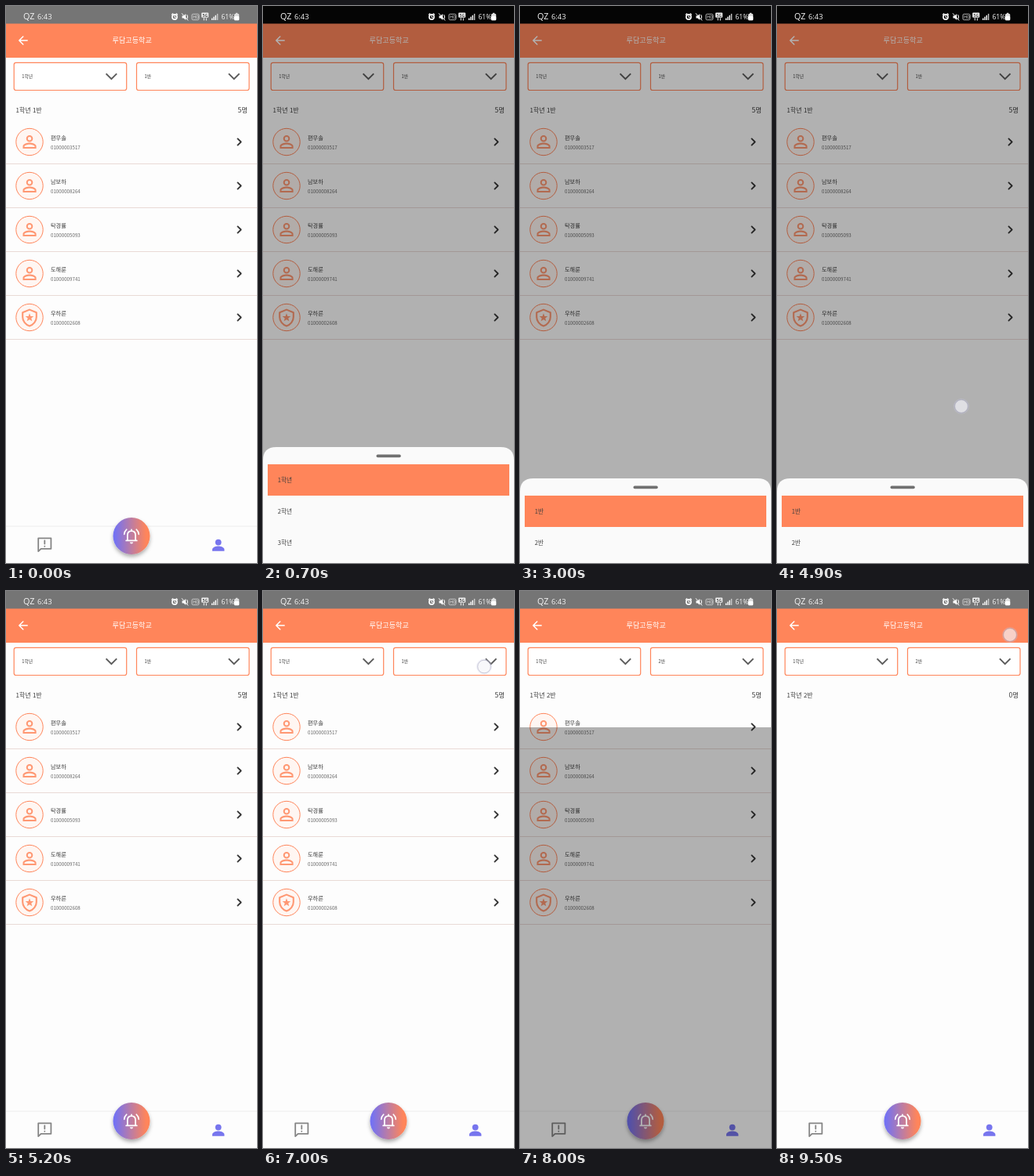
An HTML page that plays this animation: 320 by 711 pixels, repeating every 9.6 s.

```html
<!DOCTYPE html>
<html lang="ko">
<head>
<meta charset="utf-8">
<title>Class list</title>
<style>
  html, body { margin: 0; width: 100%; height: 100%; overflow: hidden; background: #fdfdfd; }
  svg { display: block; width: 100%; height: 100%; }
  text { font-family: "Noto Sans CJK KR", "Noto Sans CJK", "Noto Sans CJK JP", sans-serif; fill: #3c3c3c; }
  .status text { font-family: "Open Sans", "Noto Sans", sans-serif; fill: #f4f4f4; }
  .line { fill: none; stroke-linecap: round; stroke-linejoin: round; }
</style>
</head>
<body>
<svg id="stage" viewBox="0 0 320 711" preserveAspectRatio="none"></svg>
<script>
const ORANGE = '#ff855a', PALE = '#ff9873', LOOP = 9600;

const people = [
  ['편무솔', '01000003517'],
  ['남보하', '01000008264'],
  ['탁경률', '01000005093'],
  ['도해룬', '01000009741'],
  ['우하른', '01000002608'],
];

const text = (x, y, size, content, attrs = '') =>
  `<text x="${x}" y="${y}" font-size="${size}" ${attrs}>${content}</text>`;
const line = (d, color, width, attrs = '') =>
  `<path class="line" d="${d}" stroke="${color}" stroke-width="${width}" ${attrs}/>`;
const rect = (x, y, w, h, fill, attrs = '') =>
  `<rect x="${x}" y="${y}" width="${w}" height="${h}" fill="${fill}" ${attrs}/>`;

const personOutline = `<path transform="translate(17.2 160.7) scale(1.07)" fill="${PALE}" d="M12 5.9a2.1 2.1 0 1 1 0 4.2 2.1 2.1 0 0 1 0-4.2m0 9c2.97 0 6.1 1.46 6.1 2.1v1.1H5.9V17c0-.64 3.13-2.1 6.1-2.1M12 4C9.79 4 8 5.79 8 8s1.79 4 4 4 4-1.79 4-4-1.79-4-4-4m0 9c-2.67 0-8 1.34-8 4v3h16v-3c0-2.66-5.33-4-8-4"/>`;

function star(cx, cy, r) {
  const points = Array.from({ length: 10 }, (_, i) => {
    const angle = i * Math.PI / 5, radius = i % 2 ? r * 0.42 : r;
    return [cx + radius * Math.sin(angle), cy - radius * Math.cos(angle)].map(v => v.toFixed(2));
  });
  return `<polygon points="${points.join(' ')}" fill="${PALE}"/>`;
}
const shield = line('M30 163.6L38.8 167.3V173C38.8 178.4 35 183 30 184.6C25 183 21.2 178.4 21.2 173V167.3Z', PALE, 2.1)
  + star(30, 173.8, 5.6);

const select = (x, id, label) =>
  rect(x, 72.3, 143.5, 35.2, '#fff', `rx="2.5" stroke="${ORANGE}" stroke-width="1.2"`)
  + text(x + 10, 92.3, 5.8, label, `id="${id}"`)
  + line(`M${x + 117.4} 86.4l6.8 6.8 6.8-6.8`, '#5c5c5c', 2, 'style="stroke-linecap:butt;stroke-linejoin:miter"');

const row = ([name, phone], i) => `<g transform="translate(0 ${i * 56})">
  <circle cx="30" cy="173.5" r="17.2" fill="#fff6f2" stroke="${ORANGE}"/>
  ${i === people.length - 1 ? shield : personOutline}
  ${text(57, 170.8, 7.2, name)}
  ${text(57, 183, 6.2, phone, 'style="fill:#666"')}
  ${line('M295.4 169.4l4.2 4.1-4.2 4.1', '#333', 1.8)}
  ${rect(0, 201, 320, 1, '#e9dad6')}
</g>`;

const statusBar = `<g class="status">
  ${rect(0, 0, 320, 22.5, '#757575', 'id="statusBack"')}
  ${text(22, 17.3, 10.8, 'QZ')}${text(40, 17.2, 9.4, '6:43')}
  <circle cx="215" cy="14" r="3.1" class="line" stroke="#fff" stroke-width="1.6"/>
  ${line('M211.4 11l1.4-1.4M218.6 11l-1.4-1.4M215 12.6V14l1.2.8', '#fff', 1.1)}
  <path d="M224.5 12.4h2l2.7-2.4v8l-2.7-2.4h-2z" fill="#fff"/>
  ${line('M224.3 9.6l7.6 8.6M231 11.5q1.6 2.5 0 5', '#fff', 1)}
  ${rect(237, 10.3, 9, 7.4, 'none', 'rx="1.5" stroke="#ddd" stroke-width=".8"')}
  ${text(238.2, 16.3, 5.4, 'HD')}
  ${rect(249.2, 8.6, 9, 6.2, '#f2f2f2', 'rx="1"')}
  ${text(250.5, 13.7, 5.2, '5G', 'font-weight="700" style="fill:#555"')}
  ${line('M252.3 18v-2.4M255.3 15.8v2.4', '#fff', 1)}
  ${[0, 1, 2, 3].map(i => rect(262 + i * 2.3, 15.6 - i * 1.9, 1.4, 2.4 + i * 1.9, i < 3 ? '#fff' : '#ccc')).join('')}
  ${text(274.4, 17.2, 8.7, '61%')}
  ${rect(292.8, 8.8, 2.6, 1.4, '#ddd')}
  ${rect(291, 9.9, 6.2, 8.3, '#ddd', 'rx="1"')}${rect(291, 13, 6.2, 5.2, '#fff', 'rx="1"')}
</g>`;

const navBar = `
  ${rect(0, 664, 320, 47, '#fdfdfd')}${rect(0, 663.6, 320, 0.9, '#ececec')}
  ${line('M41.2 679.3h16.2v13.5H44.6l-3.4 3.3z', '#858585', 1.8)}
  ${line('M49.3 682.3v4.2M49.3 689.6v.2', '#858585', 1.8)}
  <circle cx="270.7" cy="684.6" r="3.9" fill="#7775ee"/>
  <path d="M263 695.7v-2c0-2.7 4.6-4.2 7.7-4.2s7.7 1.5 7.7 4.2v2z" fill="#7775ee"/>
  <circle cx="160" cy="676.5" r="23.5" fill="url(#fab)" filter="url(#shadow)"/>
  ${line('M153.2 682.4h13.6M154.9 682v-6.4c0-3.3 2-5.5 5.1-5.5s5.1 2.2 5.1 5.5v6.4M160 669.6v-1.2', '#fff', 1.8)}
  ${line('M153.8 668.2q-2.8 2.5-3.1 6.2M166.2 668.2q2.8 2.5 3.1 6.2', '#fff', 1.6)}
  <path d="M157.9 684.4h4.2q-.3 2-2.1 2t-2.1-2z" fill="#fff"/>`;

function sheet(id, items) {
  const height = 28 + items.length * 40;
  return `<g id="${id}" data-height="${height}">
    <path d="M0 ${height}V17Q0 0 17 0H303Q320 0 320 17V${height}Z" fill="#fafafa"/>
    ${rect(144.5, 9.6, 31.3, 3.6, '#707070', 'rx="1.8"')}
    ${rect(6, 22, 308, 40, ORANGE, 'class="chosen"')}
    ${items.map((item, i) => text(18.7, 45 + i * 40, 7.7, item)).join('')}
  </g>`;
}

document.getElementById('stage').innerHTML = `
  <defs>
    <linearGradient id="fab"><stop offset=".05" stop-color="#7472f2"/><stop offset=".9" stop-color="${ORANGE}"/></linearGradient>
    <filter id="shadow" x="-30%" y="-30%" width="160%" height="170%">
      <feDropShadow dx="0" dy="3" stdDeviation="2.4" flood-color="#000" flood-opacity=".32"/>
    </filter>
  </defs>
  ${rect(0, 0, 320, 711, '#fdfdfd')}
  ${rect(0, 22, 320, 44, ORANGE)}
  ${line('M27.2 44H17M21.8 39l-5 5 5 5', '#fff', 1.5)}
  ${text(160.7, 47.4, 9.1, '루담고등학교', 'text-anchor="middle" font-weight="500" style="fill:#fff"')}
  ${select(10.2, 'grade', '1학년')}${select(166.5, 'room', '')}
  ${text(12.5, 136, 8, '', 'id="heading"')}
  ${text(308, 136, 8.5, '', 'id="count" text-anchor="end"')}
  <g id="list">${people.map(row).join('')}</g>
  ${navBar}
  ${rect(0, 22, 320, 689, '#000', 'id="dim" opacity=".3"')}
  ${statusBar}
  ${sheet('gradeSheet', ['1학년', '2학년', '3학년'])}
  ${sheet('roomSheet', ['1반', '2반'])}
  <g id="touch">
    <circle r="10" fill="#c9c9e6" opacity=".3"/>
    <circle r="8.3" fill="#fff" fill-opacity=".55" stroke="#9c9cb4" stroke-opacity=".55" stroke-width=".9"/>
  </g>`;

const el = id => document.getElementById(id);
const show = (node, visible) => node.setAttribute('display', visible ? 'inline' : 'none');

// Each sheet slides up from `open` and down from `close`; the dim layer switches hard.
const OPEN_MS = 300, CLOSE_MS = 200;
const sheetRuns = [
  { id: 'gradeSheet', open: 350, close: 2000 },
  { id: 'roomSheet', open: 2700, close: 4950 },
  { id: 'roomSheet', open: 7100, close: 7800 },
];
// start, end, x, y
const touches = [
  [200, 400, 130, 92], [1700, 1950, 235, 480], [2600, 2800, 285, 94],
  [4800, 5000, 235, 511], [7000, 7200, 282, 96.5], [7800, 7950, 235, 686],
  [9400, 9600, 297, 56],
];
const CHOSEN_AT = 7850, TEAR_START = 8000, TEAR_END = 8100, EMPTY_AT = 8200;

const clamp = v => Math.min(1, Math.max(0, v));
const ease = v => v * v * (3 - 2 * v);

function render(t) {
  const run = sheetRuns.find(r => t >= r.open && t < r.close + CLOSE_MS);
  for (const id of ['gradeSheet', 'roomSheet']) {
    const node = el(id), active = run && run.id === id;
    show(node, active);
    if (!active) continue;
    const raised = ease(clamp((t - run.open) / OPEN_MS)) - ease(clamp((t - run.close) / CLOSE_MS));
    node.setAttribute('transform', `translate(0 ${711 - node.dataset.height * raised})`);
  }

  // The screen refreshes from the top down as the last sheet is dismissed.
  const tearing = t >= TEAR_START && t < TEAR_END;
  const dimTop = tearing ? 174 : 22;
  show(el('dim'), run || tearing);
  el('dim').setAttribute('y', dimTop);
  el('dim').setAttribute('height', 711 - dimTop);
  el('statusBack').setAttribute('fill', run ? '#050505' : '#757575');

  const second = t >= CHOSEN_AT, empty = t >= EMPTY_AT;
  const room = second ? '2반' : '1반';
  el('room').textContent = room;
  el('heading').textContent = `1학년 ${room}`;
  el('count').textContent = empty ? '0명' : '5명';
  el('roomSheet').querySelector('.chosen').setAttribute('y', second ? 62 : 22);
  show(el('list'), !empty);

  const touch = touches.find(([start, end]) => t >= start && t < end);
  show(el('touch'), touch);
  if (touch) el('touch').setAttribute('transform', `translate(${touch[2]} ${touch[3]})`);
}

const began = performance.now();
function tick() {
  render((performance.now() - began) % LOOP);
  requestAnimationFrame(tick);
}
tick();
</script>
</body>
</html>
```
